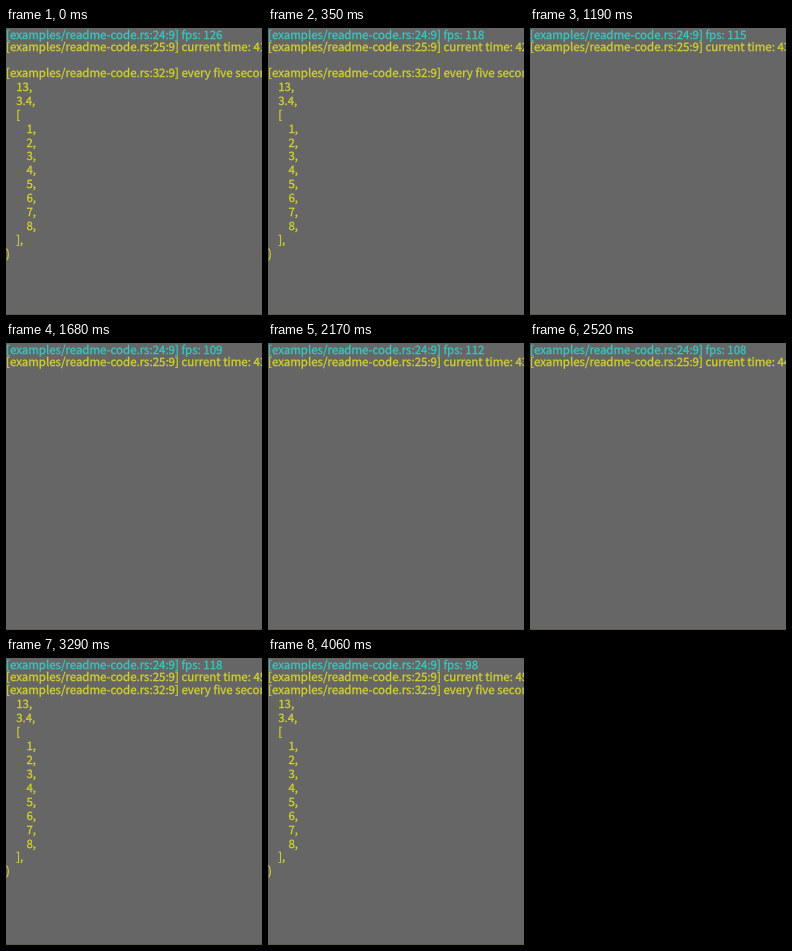
An HTML page that plays this animation: 256x287 px, repeating every 4130 ms.

```html
<!DOCTYPE html>
<html lang="en">
<head>
<meta charset="utf-8">
<style>
  html, body { margin: 0; width: 100%; height: 100%; overflow: hidden; background: #666; }
  svg { display: block; width: 256px; height: 287px; }
  text {
    font: 11.48px "Noto Sans CJK JP", "Noto Sans CJK SC", "Noto Sans CJK", "Open Sans", sans-serif;
    fill: #d2d22e;
    stroke: #d2d22e;
    stroke-width: 0.3px;
    text-rendering: geometricPrecision;
    white-space: pre;
  }
  #fps { fill: #35cac2; stroke: #35cac2; }
</style>
</head>
<body>
<svg viewBox="0 0 256 287">
  <rect width="256" height="287" fill="#666"/>
  <rect y="286" width="256" height="1" fill="#5c5c48"/>
  <text id="fps" y="10.6"></text>
  <text id="clock" y="23.4"></text>
  <g id="dump"></g>
</svg>
<script>
const LOOP = 4130, STEP = 70;
const LINE = 13.95, INDENT = 10.2;
const FPS_KEYS = [[0, 126], [700, 99], [1100, 115], [2100, 112], [2800, 97], [3200, 118], [4000, 98], [4200, 98]];

const fps = document.getElementById("fps");
const clock = document.getElementById("clock");
const dump = document.getElementById("dump");

const prefix = (line) => `[examples/readme-code.rs:${line}:9] `;

function addLine(content, depth, row) {
  const el = document.createElementNS("http://www.w3.org/2000/svg", "text");
  el.setAttribute("x", depth * INDENT);
  el.setAttribute("y", row * LINE);
  el.textContent = content;
  dump.append(el);
}

const items = Array.from({ length: 8 }, (_, i) => [`${i + 1},`, 2]);
[
  [prefix(32) + "every five seconds: (", 0],
  ["13,", 1], ["3.4,", 1], ["[", 1],
  ...items,
  ["],", 1], [")", 0]
].forEach(([content, depth], row) => addLine(content, depth, row));

// The reading refreshes every 100 ms and wobbles between its key values.
function frameRate(t) {
  const tick = Math.floor(t / 100) * 100;
  const next = FPS_KEYS.findIndex(([time]) => time > tick);
  const [t0, a] = FPS_KEYS[next - 1], [t1, b] = FPS_KEYS[next];
  const u = (tick - t0) / (t1 - t0);
  const wobble = 6 * Math.sin(tick * 0.023) * Math.sin(Math.PI * u);
  return Math.round(a + (b - a) * u + wobble);
}

function render(ms) {
  const t = Math.floor((ms % LOOP) / STEP) * STEP;
  const seconds = 41 + Math.floor((t + 810) / 1000);
  const expiring = seconds < 43;
  fps.textContent = prefix(24) + "fps: " + frameRate(t);
  clock.textContent = prefix(25) + `current time: ${seconds}.00`;
  dump.style.display = expiring || seconds >= 45 ? "" : "none";
  dump.setAttribute("transform", `translate(0 ${expiring ? 48.8 : 36.1})`);
}

let start;
function tick(now) {
  start ??= now;
  render(now - start);
  requestAnimationFrame(tick);
}
render(0);
requestAnimationFrame(tick);
</script>
</body>
</html>
```
